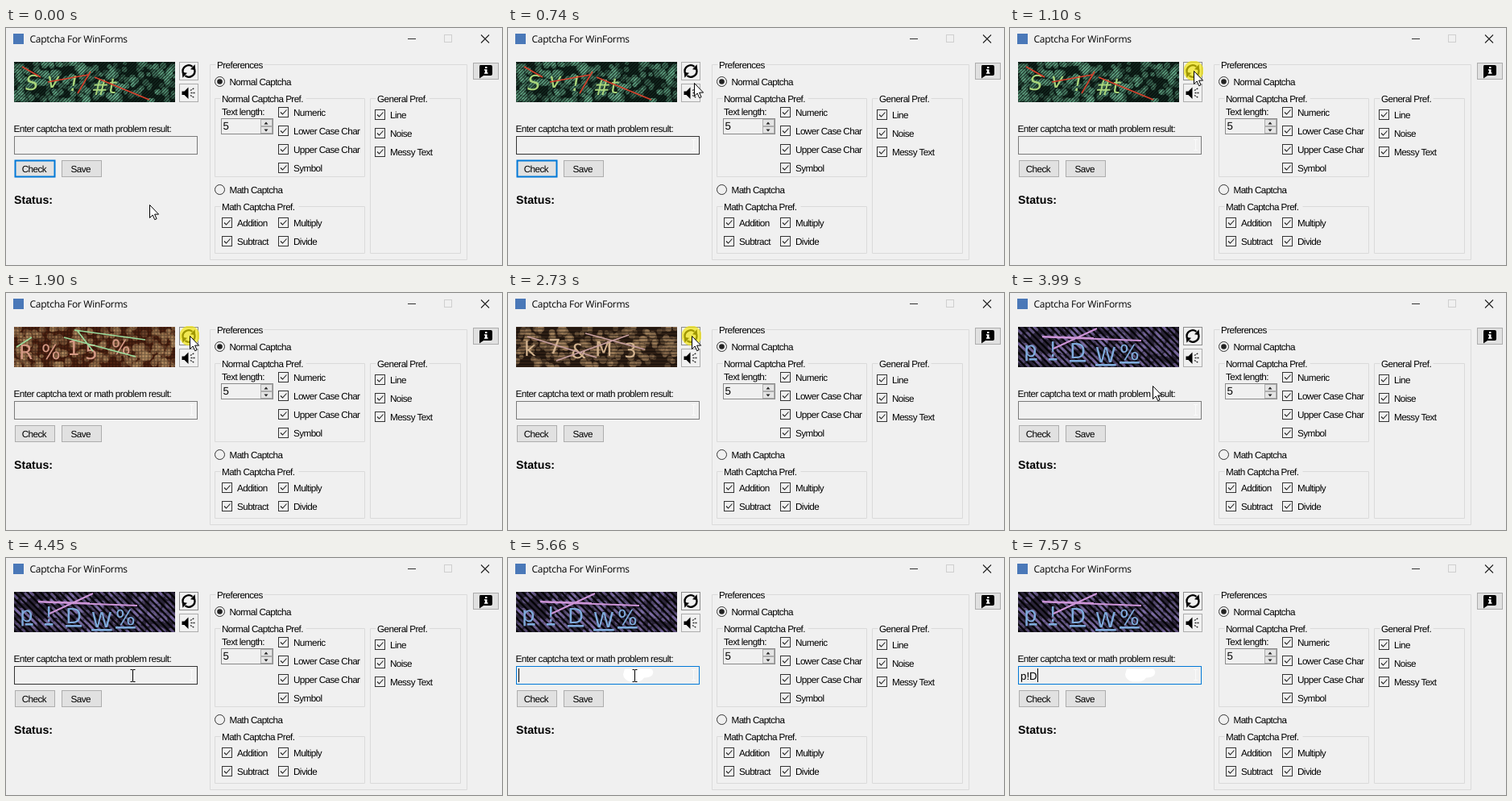
An HTML page for the animation above (8 s loop, 616 px wide and 294 px high).

```html
<!DOCTYPE html>
<html lang="en">
<head>
<meta charset="utf-8">
<title>Captcha For WinForms</title>
<style>
html, body { margin: 0; width: 100%; height: 100%; overflow: hidden; background: #f0f0f0; }
svg { display: block; }
text { font: 11.7px "Liberation Sans", Arial, sans-serif; letter-spacing: -.57px; text-rendering: geometricPrecision; white-space: pre; }
#title { font: 12px "Open Sans", "Noto Sans", sans-serif; letter-spacing: -.28px; }
#status { font-weight: bold; font-size: 14.2px; letter-spacing: 0; }
#typed, #count { font-size: 13.33px; letter-spacing: 0; }
.glyph { font-family: "DejaVu Sans", sans-serif; letter-spacing: 0; }
</style>
</head>
<body>
<svg id="stage" width="616" height="294" viewBox="0 0 616 294">
  <defs>
    <clipPath id="view"><rect x="10" y="42" width="200" height="50"/></clipPath>
    <clipPath id="press"><rect x="216" y="41" width="24" height="24"/></clipPath>
  </defs>
  <rect width="616" height="294" fill="#f0f0f0"/>
  <rect x="9" y="7" width="13" height="13" fill="#4a78b8"/>
  <text id="title" x="29.5" y="18">Captcha For WinForms</text>
  <g fill="none">
    <path d="M499 13.5h10" stroke="#333"/>
    <rect x="544.5" y="8.5" width="9" height="9" stroke="#cfcfcf"/>
    <path d="M590 8.5l10 10m0-10l-10 10" stroke="#222" stroke-width="1.1"/>
  </g>
  <g id="form"></g>
  <text id="status" x="10" y="218">Status:</text>

  <rect id="box" x="10.5" y="134.5" width="227" height="22" fill="#f0f0f0"/>
  <path id="trace" d="M228 138.5h5m-2.5 0v13m-2.5 0h5" stroke="#fafafa" fill="none"/>
  <path id="glow" d="M145 137.5H178q4 3 1 8q-3 3-10 3q-3 5-10 5H152q-8-2-9-9z" fill="#fff"/>
  <text id="typed" x="13" y="151"></text>
  <rect id="caret" y="137" width="1" height="17"/>

  <rect id="refresh" x="215.5" y="42.5" width="23" height="22" fill="#f0f0f0"/>
  <g id="arc"><path d="M219.8 55.5A7.4 7.4 0 0 1 231.5 47.8" fill="none" stroke="#000" stroke-width="2.3"/><path d="M229 51.3L235.3 52.3L234.6 45.3z"/></g>
  <use href="#arc" transform="rotate(180 227 53.5)"/>
  <rect x="215.5" y="69.5" width="23" height="22" fill="#f0f0f0" stroke="#adadad"/>
  <path d="M218.5 78.5h3l5-5v14.500l-5-5h-3z"/>
  <path d="M229 77.500l5-3M229.500 80.500h5.500M229 83.500l5 3" stroke="#222" stroke-width="1.300" stroke-dasharray="2 1"/>
  <circle id="mark" cx="228" cy="53" r="12.5" fill="#f2e400" opacity=".66" clip-path="url(#press)"/>

  <rect x="580.5" y="43.5" width="31" height="20" fill="#e1e1e1" stroke="#adadad"/>
  <path d="M589 46h13q2 0 2 2v9q0 2-2 2h-9l-5 3.5V48q0-2 1-2z"/>
  <path d="M595 48h2.5v2H595zM594 51.3h3.5v4h1v1.5h-4.5v-1.5h1v-2.5h-1z" fill="#fff"/>

  <g id="captchas" clip-path="url(#view)"></g>
  <path id="arrow" d="M.5.5v16l3.7-3.5 2.5 5.7 2.4-1-2.5-5.6h5z" fill="#fff" stroke="#000"/>
  <path id="beam" d="M-3-7.5h2.5l.5.5.5-.5H3M0-7V7M-3 7.5h2.5L0 7l.5.5H3" fill="none" stroke="#000"/>
</svg>
<script>
const $ = id => document.getElementById(id);
const NS = 'http://www.w3.org/2000/svg';
const LOOP = 8000;

function add(parent, tag, attrs, text) {
  const el = document.createElementNS(NS, tag);
  for (const k in attrs) el.setAttribute(k, attrs[k]);
  if (text) el.textContent = text;
  parent.appendChild(el);
  return el;
}

// Form controls
const form = $('form');
const label = (x, y, s, anchor = 'start') => add(form, 'text', { x, y, 'text-anchor': anchor }, s);
const rect = (x, y, width, height, fill, stroke) => add(form, 'rect', { x, y, width, height, fill, stroke });
const line = (d, stroke, width = 1) => add(form, 'path', { d, fill: 'none', stroke, 'stroke-width': width });

function group(x, y, w, h, gap, s) {
  line(`M${x + 7} ${y}H${x}v${h}h${w}v${-h}H${x + 9 + gap}`, '#dadada');
  label(x + 8.5, y + 4.5, s);
}
function checkBox(x, y, s) {
  rect(x, y, 12, 12, '#f0f0f0', '#333');
  line(`M${x + 2.5} ${y + 6}l2.5 2.5 5-5.5`, '#222', 1.1);
  label(x + 18.5, y + 10.5, s);
}
function radio(y, s, on) {
  add(form, 'circle', { cx: 265.5, cy: y, r: 6, fill: '#f0f0f0', stroke: '#333' });
  if (on) add(form, 'circle', { cx: 265.5, cy: y, r: 3.3, fill: '#222' });
  label(277.5, y + 4.5, s);
}
function button(x, s) {
  const el = rect(x, 164.5, 49, 20, '#e1e1e1', '#adadad');
  label(x + 23.3, 179, s, 'middle');
  return el;
}

label(9.5, 129, 'Enter captcha text or math problem result:').style.letterSpacing = '-.52px';
const check = button(11.5, 'Check');
button(69.5, 'Save');
group(253.5, 45.5, 319, 242, 58, 'Preferences');
group(259.5, 87.5, 186, 97, 104, 'Normal Captcha Pref.');
group(452.5, 87.5, 112, 192, 64, 'General Pref.');
group(259.5, 221.5, 186, 58, 95, 'Math Captcha Pref.');
radio(66.5, 'Normal Captcha', true);
radio(200.5, 'Math Captcha', false);
['Numeric', 'Lower Case Char', 'Upper Case Char', 'Symbol'].forEach((s, i) => checkBox(338.5, 98.5 + 23 * i, s));
['Line', 'Noise', 'Messy Text'].forEach((s, i) => checkBox(458.5, 101.5 + 23 * i, s));
['Addition', 'Multiply', 'Subtract', 'Divide'].forEach((s, i) =>
  checkBox(268.5 + 70 * (i % 2), 235.5 + 23 * (i >> 1), s));

label(268, 108, 'Text length:');
rect(267.5, 112.5, 64, 19, '#f0f0f0', '#8a8a8a');
label(269.5, 126, '5').id = 'count';
for (const [y, tri] of [[113.5, 'M320.5 119.5h5l-2.5-3z'], [122.5, 'M320.5 125.5h5l-2.5 3z']]) {
  rect(316.5, y, 14, 8, '#e4e4e4', '#adadad');
  add(form, 'path', { d: tri, fill: '#222' });
}

// Captcha pictures, each shown from its start time on
const looks = [
  { from: 0, back: '#0f211a', blob: '#62a585', hatch: 'M-1 1l2-2M0 4l4-4M3 5l2-2', cell: 4, weight: 1, shade: .7,
    ink: '#a9d67c', stroke: '#d8402c', thick: 1.5, deco: 'none', slant: 'italic', size: 26,
    text: 'Sv!#t', at: [24, 77, 51, 74, 79, 78, 106, 83, 127, 81],
    lines: 'M20 48L43 61M52 67L102 58M105 54L89 81M110 61L178 89' },
  { from: 1200, back: '#4a2010', blob: '#b28d62', hatch: 'M0 .5h4M.5 0v4', cell: 4, weight: 1, shade: .3,
    ink: '#d69a86', stroke: '#9cdc9c', thick: 1.7, deco: 'none', slant: 'normal', size: 25,
    text: 'R%15%', at: [16, 82, 44, 82, 76, 77, 98, 82, 131, 76],
    lines: 'M13 67L32 55M85 46L173 58M72 55L161 79M88 46L108 72' },
  { from: 2000, back: '#2c1d13', blob: '#a5845f', hatch: 'M0 .5h4', cell: 4, weight: 1, shade: .5,
    ink: '#d4b490', stroke: '#c8a0a0', thick: 1.6, deco: 'none', slant: 'normal', size: 25,
    text: 'k7&M3', at: [20, 78, 50, 75, 78, 81, 108, 78, 144, 80],
    lines: 'M24 54L110 80M60 84L150 52M96 50L170 70' },
  { from: 2880, back: '#1c120d', blob: '#98775e', hatch: 'M.5 0v4', cell: 4, weight: 1.2, shade: .7,
    ink: '#c6c6d2', stroke: '#d6bc84', thick: 1.7, deco: 'line-through', slant: 'normal', size: 25,
    text: '%$#|1', at: [22, 77, 48, 76, 78, 75, 101, 76, 134, 75],
    lines: 'M40 50L110 88M15 72L106 46M82 47L107 61M84 61L156 54' },
  { from: 3680, back: '#2a2338', blob: '#8675b0', hatch: 'M-2 6l4 4M0 0l8 8M6-2l4 4', cell: 8, weight: 2.6, shade: .9,
    ink: '#7fabdc', stroke: '#cd95d8', thick: 2.1, deco: 'underline', slant: 'normal', size: 26,
    text: 'p!DW%', at: [17, 79, 48, 79, 74, 81, 106, 86, 136, 83],
    lines: 'M40 54.500L163 59M54 69L108 44M40 54L104 56' }
];

function rng(seed) {
  return () => (seed = (seed * 16807) % 2147483647) / 2147483647;
}

looks.forEach((c, i) => {
  const g = c.node = add($('captchas'), 'g', {});
  const rand = rng(4177 + 911 * i);
  const pat = add(g, 'pattern', { id: 'hatch' + i, width: c.cell, height: c.cell, patternUnits: 'userSpaceOnUse' });
  add(pat, 'path', { d: c.hatch, stroke: '#000', 'stroke-width': c.weight, fill: 'none' });
  const area = fill => add(g, 'rect', { x: 10, y: 42, width: 200, height: 50, fill });
  area(c.back);
  for (let n = 0; n < 240; n++) {
    add(g, 'circle', { cx: 10 + 200 * rand(), cy: 42 + 50 * rand(), r: 2.5 + 2.5 * rand(),
      fill: c.blob, opacity: 0.25 + 0.4 * rand() });
  }
  area(`url(#hatch${i})`).setAttribute('opacity', c.shade);
  [...c.text].forEach((ch, k) => {
    const el = add(g, 'text', { x: c.at[2 * k], y: c.at[2 * k + 1], fill: c.ink, class: 'glyph' }, ch);
    el.style.fontSize = c.size + 'px';
    el.style.fontStyle = c.slant;
    el.style.textDecoration = c.deco;
  });
  add(g, 'path', { d: c.lines, stroke: c.stroke, 'stroke-width': c.thick });
});

// Pointer: time, x, y
const path = [
  [0, 178, 219], [260, 178, 219], [380, 188, 207], [500, 213, 181], [600, 230, 146], [680, 233, 100],
  [740, 230.5, 68], [850, 229, 56], [1040, 228, 53], [3680, 228, 53], [3800, 217, 74], [3900, 197, 98],
  [3990, 177, 115], [4140, 164, 135], [4340, 157.5, 145.5], [LOOP, 157.5, 145.5]
];
const clamp = v => Math.max(0, Math.min(1, v));

function pointer(t) {
  const q = Math.max(0, Math.floor((t - 40) / 50) * 50 + 40);
  const i = path.findIndex((p, k) => k && q <= p[0]);
  const a = path[i - 1], b = path[i], u = (q - a[0]) / (b[0] - a[0]);
  return [a[1] + (b[1] - a[1]) * u, a[2] + (b[2] - a[2]) * u];
}

const within = (t, spans) => spans.some(([a, b]) => t >= a && t < b);
const show = (id, on) => $(id).setAttribute('visibility', on ? 'visible' : 'hidden');
const mix = (a, b, u) => `rgb(${a.map((v, i) => Math.round(v + (b[i] - v) * u))})`;
const GREY = [122, 122, 122], DARK = [51, 51, 51], BLUE = [0, 120, 215];

function boxColor(t) {
  if (t >= 4500) return mix(DARK, BLUE, clamp((Math.floor((t - 4500) / 50) + 1) / 3));
  if (t >= 4140) return mix(GREY, DARK, clamp((t - 4140) / 150));
  return mix(GREY, DARK, clamp((t - 540) / 80) * clamp((1000 - t) / 200));
}

function draw(t) {
  looks.forEach((c, i) => {
    const end = i + 1 < looks.length ? looks[i + 1].from : LOOP;
    c.node.setAttribute('display', t >= c.from && t < end ? 'inline' : 'none');
  });
  const focused = t < 1100;
  check.setAttribute('stroke', focused ? '#0078d7' : '#adadad');
  check.setAttribute('stroke-width', focused ? 2 : 1);
  $('refresh').setAttribute('stroke', focused ? '#adadad' : '#8c8c8c');
  show('mark', within(t, [[1100, 1200], [1900, 2000], [2730, 2880], [3530, 3680]]));

  $('box').setAttribute('stroke', boxColor(t));
  show('trace', t >= 640);
  show('glow', t >= 4550);
  const n = t < 6400 ? 0 : t < 6910 ? 1 : t < 7570 ? 2 : 3;
  $('typed').textContent = 'p!D'.slice(0, n);
  $('caret').setAttribute('x', [13, 21, 24, 34][n]);
  show('caret', within(t, [[4600, 5110], [5660, 6170], [6400, 7420], [7570, LOOP]]));

  const [x, y] = pointer(t);
  const inBox = x > 10 && x < 238 && y >= 134 && y < 157;
  show('arrow', !inBox);
  show('beam', inBox && t < 6400);
  $('arrow').setAttribute('transform', `translate(${Math.round(x)} ${Math.round(y)})`);
  $('beam').setAttribute('transform', `translate(${Math.floor(x) + 0.5} ${Math.floor(y) + 1})`);
}

const start = performance.now();
function tick() {
  draw((performance.now() - start) % LOOP);
  requestAnimationFrame(tick);
}
tick();
</script>
</body>
</html>
```
